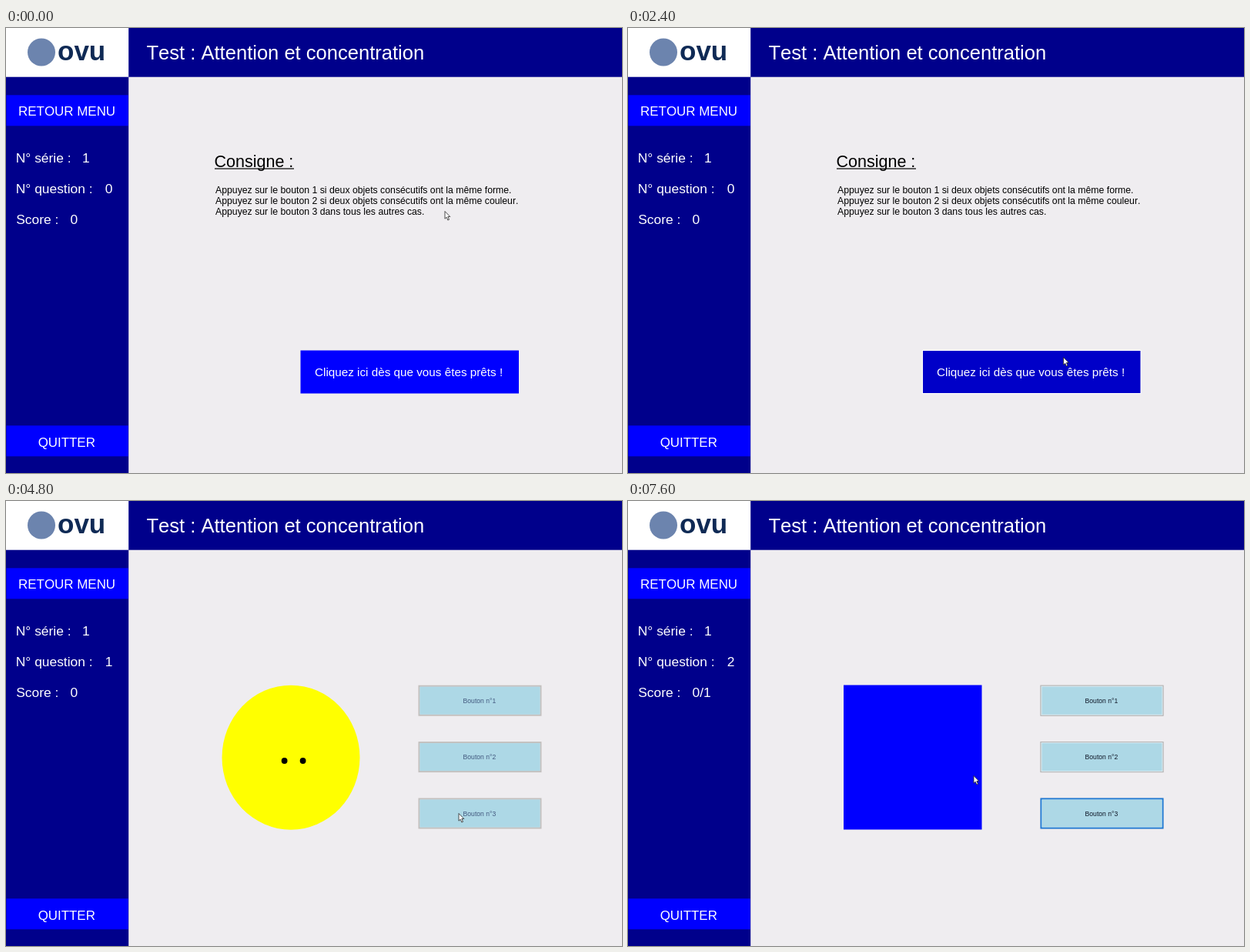
These frames come from a looping animation (800x579 px, 8 s). An HTML page with a canvas:

```html
<!DOCTYPE html>
<html lang="fr">
<head>
<meta charset="utf-8">
<title>Attention et concentration</title>
<style>
html, body { margin: 0; height: 100%; overflow: hidden; background: #efedf0; }
canvas { display: block; }
</style>
</head>
<body>
<canvas width="800" height="579"></canvas>
<script>
const ctx = document.querySelector('canvas').getContext('2d');
const LOOP = 8000, STEP = 100;
const NAVY = '#00008b', BLUE = '#0000ff', GREY = '#efedf0';

// Pointer keyframes: time, x, y
const PATH = [
  [0, 569.5, 238], [200, 628, 208], [400, 667, 222], [600, 540, 242], [900, 578, 333],
  [1200, 568, 405], [1400, 565, 428], [3300, 565, 428], [3600, 587.5, 406],
  [6400, 587.5, 406], [6500, 566.5, 389], [6700, 400, 312], [6800, 329, 285],
  [6900, 390, 259], [7100, 590, 300], [7300, 448.5, 357], [LOOP, 448.5, 357],
];

const ramp = (t, from, to) => Math.min(1, Math.max(0, (t - from) / (to - from)));

function rect(x, y, w, h, color) {
  ctx.fillStyle = color;
  ctx.fillRect(x, y, w, h);
}

function ellipse(x, y, rx, ry, color) {
  ctx.fillStyle = color;
  ctx.beginPath();
  ctx.ellipse(x, y, rx, ry, 0, 0, 2 * Math.PI);
  ctx.fill();
}

function text(str, x, y, size, color = '#fff', weight = '') {
  ctx.font = `${weight} ${size}px "Liberation Sans", Arial, sans-serif`;
  ctx.fontKerning = 'none';
  ctx.fillStyle = color;
  ctx.fillText(str, x, y);
}

function frame(question, score) {
  rect(0, 0, 800, 579, GREY);
  rect(0, 0, 800, 63.7, NAVY);
  rect(0, 63, 159.2, 516, NAVY);
  rect(0, 0, 159.2, 63.7, '#fff');
  ellipse(46, 31.5, 18, 18, '#6c84ae');
  text('ovu', 67, 42, 35, '#0f2a55', 'bold');
  text('Test : Attention et concentration', 182.5, 41, 25.55);
  rect(0.5, 87.3, 158.2, 40, BLUE);
  rect(0.5, 517.3, 158.2, 40, BLUE);
  text('RETOUR MENU', 16, 114, 16.95);
  text('QUITTER', 41.7, 544.5, 16.9);
  text('N° série :', 12.8, 175, 17.4);
  text('1', 99, 175, 17.4);
  text('N° question :', 12.8, 215, 17.4);
  text(question, 128.8, 215, 17.4);
  text('Score :', 13.2, 255, 17.4);
  text(score, 83.6, 255, 17.4);
}

function instructions(hover, pressed) {
  text('Consigne :', 270.5, 181, 21.5, '#000');
  rect(271, 182.4, 103, 1.3, '#111');
  [
    'Appuyez sur le bouton 1 si deux objets consécutifs ont la même forme.',
    'Appuyez sur le bouton 2 si deux objets consécutifs ont la même couleur.',
    'Appuyez sur le bouton 3 dans tous les autres cas.',
  ].forEach((line, i) => text(line, 272, 214.8 + i * 14.2, 12.28, '#000'));
  if (hover) {
    rect(382, 419, 284.5, 57, '#fff');
    rect(383, 420, 282.5, 55, pressed ? '#0000c8' : '#0000e1');
  } else {
    rect(382.5, 419.5, 283.5, 56, BLUE);
  }
  text('Cliquez ici dès que vous êtes prêts !', 401, 453, 15.25);
}

function answerButton(n, alpha, border, width, ink) {
  const y = 166.8 + n * 73.4;
  ctx.globalAlpha = alpha;
  rect(535.5, y - 0.5, 160, 40, border);
  rect(535.5 + width, y - 0.5 + width, 160 - 2 * width, 40 - 2 * width, '#dcecf2');
  rect(537.5, y + 1.5, 156, 36, '#add8e6');
  text('Bouton n°' + n, 593.6, y + 22.7, 8.6, ink);
  ctx.globalAlpha = 1;
}

function answers(t) {
  const enabled = ramp(t, 7300, 7600);
  const focus = ramp(t, 3300, 3600) - ramp(t, 4300, 4800);
  for (let n = 1; n <= 3; n++) {
    answerButton(n, 1, '#c3c0be', 2, '#43597f');
    if (n === 3 && focus) answerButton(n, focus, '#3a8fd6', 1, '#101828');
    if (enabled) answerButton(n, enabled, n === 3 ? '#1f7bd8' : '#b4b4b4', n === 3 ? 2 : 1, '#101828');
  }
}

function pointer(t) {
  const i = Math.max(1, PATH.findIndex(p => p[0] >= t));
  const [t0, x0, y0] = PATH[i - 1], [t1, x1, y1] = PATH[i];
  const k = ramp(t, t0, t1);
  ctx.save();
  ctx.translate(x0 + (x1 - x0) * k, y0 + (y1 - y0) * k);
  const arrow = new Path2D('M.5 .5V10.2L2.7 8.2L4.3 12L6 11.3L4.4 7.5H7.3Z');
  ctx.fillStyle = '#fff';
  ctx.fill(arrow);
  ctx.strokeStyle = '#222';
  ctx.lineWidth = 0.8;
  ctx.stroke(arrow);
  ctx.restore();
}

function draw(time) {
  const t = Math.floor(time % LOOP / STEP) * STEP;
  const started = t >= 2500, second = t >= 7400;
  frame(second ? '2' : started ? '1' : '0', second ? '0/1' : '0');
  if (!started) {
    instructions(t >= 1300, t >= 2400);
  } else if (second) {
    rect(280, 239.5, 179.5, 188, BLUE);
  } else {
    ellipse(370, 333.7, 89.5, 94, '#ffff00');
    ellipse(361.6, 338, 3.9, 3.9, '#000');
    ellipse(385.6, 338, 3.9, 3.9, '#000');
  }
  if (t >= 2600) answers(t);
  pointer(t);
}

function tick() {
  draw(performance.now());
  requestAnimationFrame(tick);
}
tick();
</script>
</body>
</html>
```
